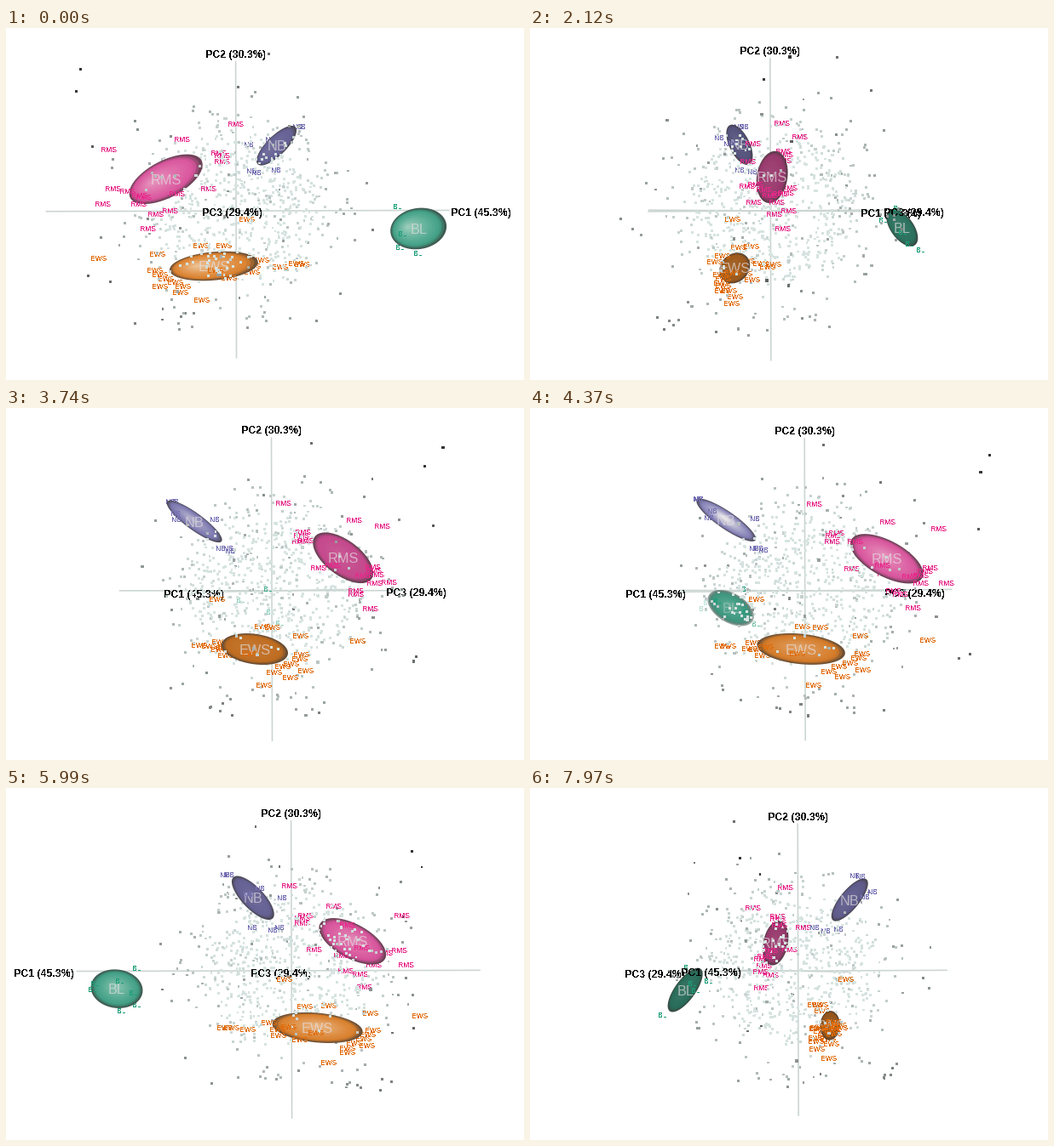
Write a matplotlib script that moves like this. It is 608 px wide and 414 px high and loops after 8000 ms.

```python
import numpy as np
import matplotlib.pyplot as plt
from matplotlib.animation import FuncAnimation
from matplotlib.collections import PolyCollection
from matplotlib.colors import to_rgb

W, H, DPI = 608, 414, 64
PT = 72 / DPI                      # points per pixel
LOOP, INTERVAL = 8000, 40
HOLD, STEP, DEGREES = 500, 90, 3
CENTER_X, CENTER_Y, CAMERA = 302.5, 215, 1600
ORIGIN = np.array([-32.5, 0, -2.5])
LAYERS = 12

plt.rcParams["font.family"] = "Liberation Sans"
fig = plt.figure(figsize=(W / DPI, H / DPI), dpi=DPI, facecolor="white")
ax = fig.add_axes([0, 0, 1, 1])
ax.set(xlim=(0, W), ylim=(H, 0))
ax.axis("off")

# Sample positions: x right, y down, z towards the viewer.
RMS = [(-32, -101, 13), (-91, -80, 75), (-174, -69, 70), (-52, -67, 29),
       (-48, -64, 28), (-48, -57, 26), (-100, -55, 12), (-170, -25, 60),
       (-153, -22, 70), (-180, -8, 75), (-138, -17, 80), (-140, -8, 77),
       (-135, -16, 65), (-98, -19, 62), (-105, 0, 70), (-122, 4, 62),
       (-129, 20, 77), (-63, -26, 43), (-120, -28, 36)]
NB = [(43, -106, -100), (47, -106, -95), (-18, -82, -66), (-15, -49, -58),
      (-8, -47, -44), (15, -50, -38), (9, -90, -105), (22, -84, -100)]
BL = [(151, -4, 64), (170, 11, 33), (200, 14, 40), (203, 21, 35),
      (156, 26, 69), (152, 41, 81), (171, 48, 86)]
EWS = [(-20, 10, -65), (-190, 54, 33), (-125, 50, -5), (-75, 41, -18),
       (-47, 41, -20), (-128, 70, -5), (-122, 75, -5), (-116, 80, -12),
       (-105, 84, -18), (-122, 88, 2), (-96, 90, -25), (-98, 96, -6),
       (-74, 106, -28), (-58, 71, -38), (-41, 80, -22), (-14, 74, -52),
       (-3, 59, -56), (-13, 67, -60), (20, 67, -42), (40, 64, -66),
       (47, 65, -51), (-25, 64, -56)]
OUTLIERS = [(-197, -153, 131), (-205, -131, 105), (6, -177, 64),
            (-185, -69, 125), (-193, 72, 100), (-168, 78, 110),
            (-126, 134, -85), (-126, 121, -95), (-103, 131, -90),
            (-98, 127, -100), (-87, 127, -95), (3, 127, 35), (62, 131, -20),
            (92, 100, -40), (97, -13, 10), (74, -42, 20)]


def lerp(a, b, t):
    return np.asarray(a) + (np.asarray(b) - np.asarray(a)) * t


def view(points, angle):
    """Turn about the vertical axis; return screen x, y, depth and scale."""
    x, y, z = np.asarray(points, float).T
    c, s = np.cos(angle), np.sin(angle)
    side, depth = x * c + z * s, z * c - x * s
    scale = CAMERA / (CAMERA - depth)
    sx = CENTER_X + side * scale + 0.0028 * y
    sy = CENTER_Y + y * scale - 0.0028 * side - 0.006 * depth
    return sx, sy, depth, scale


def label(text, px, **style):
    return ax.text(0, 0, text, fontsize=px * PT, ha="center", va="center", **style)


def visible(depth):
    """Things fade out at the far clipping plane."""
    return float(np.clip((depth + 181) / 22, 0, 1))


class Cluster:
    LEVELS = np.linspace(1, 0.08, 16)
    CIRCLE = np.array([np.cos(np.linspace(0, 2 * np.pi, 60)),
                       np.sin(np.linspace(0, 2 * np.pi, 60))])

    def __init__(self, name, color, body, center, shape, samples):
        self.body, self.center, self.shape = np.array(to_rgb(body)), center, shape
        xx, xz, zz = shape[:3]
        self.narrow, self.wide = np.sqrt(np.linalg.eigvalsh([[xx, xz], [xz, zz]]))
        self.shell = PolyCollection([], linewidths=0)
        ax.add_collection(self.shell, autolim=False)
        self.title = label(name, 16.3, color="#e6e0e2", alpha=0.65)
        self.samples = samples
        self.tags = [label(name, 8.5, color=color, antialiased=False) for _ in samples]

    def draw(self, angle):
        (x,), (y,), (depth,), (scale,) = view([self.center], angle)
        c, s = np.cos(angle), np.sin(angle)
        xx, xz, zz, xy, zy, yy = self.shape
        var = c * c * xx + 2 * c * s * xz + s * s * zz
        cov = -(c * xy + s * zy)
        root = np.linalg.cholesky([[var, cov], [cov, yy]]) * scale

        broad = np.clip((np.sqrt(var) - self.narrow) / (self.wide - self.narrow), 0, 1)
        gloss = broad ** 8
        tone = self.body * (0.66 + 0.34 * broad)
        rim = lerp(tone * 0.6, (0.36, 0.34, 0.33), 0.5)
        drift = np.array([-0.2 * (1 + c), -0.12])
        verts, colors = [], []
        for t in self.LEVELS:
            inner = 1 - t
            outline = root @ (self.CIRCLE * t + (drift * inner)[:, None])
            verts.append((outline + [[x], [y]]).T)
            color = lerp(rim, tone, min(1, inner * 7))
            white = min(1, 0.1 * inner + 0.85 * gloss * inner ** 1.2)
            colors.append((*lerp(color, (1, 1, 0.96), white), visible(depth)))
        self.shell.set_verts(verts)
        self.shell.set_facecolor(colors)
        self.shell.set_zorder(depth)

        self.title.set_position((x, y + 1.6))
        self.title.set_alpha(0.65 * visible(depth))
        self.title.set_zorder(depth + 1)
        for tag, px, py, d, _ in zip(self.tags, *view(self.samples, angle)):
            tag.set_position((px, py + 0.8))
            tag.set_zorder(d + 12)
            tag.set_alpha(visible(d))


def make_cloud():
    rng = np.random.default_rng(11)

    def shell(count, radius, spread, squash):
        way = rng.normal(size=(count, 3))
        way /= np.linalg.norm(way, axis=1)[:, None]
        return way * np.abs(rng.normal(radius, spread, (count, 1))) * squash

    core = shell(620, 88, 22, (1, 0.9, 1)) + (-28, -8, 0)
    halo = shell(105, 138, 20, (1, 0.9, 1)) + (-32, 2, 0)
    return np.vstack([core, halo, OUTLIERS])


cloud = make_cloud()
distance = np.linalg.norm(cloud - ORIGIN, axis=1)
shade = np.clip((distance - 95) / 150, 0, 1)[:, None]
cloud_colors = lerp((0.84, 0.89, 0.88), (0.2, 0.2, 0.2), shade)
layers = [ax.scatter([], [], marker="s", linewidths=0, antialiased=False)
          for _ in range(LAYERS)]

# Each axis: negative end, positive end, and the label with its place.
AXES = [((-223, 0, 0), (250, 0, 0), "PC1 (45.3%)", (288, 2.5, 0)),
        ((0, 173, 0), (0, -176, 0), "PC2 (30.3%)", (0, -185, 0)),
        ((0, 0, -180), (0, 0, 168), "PC3 (29.4%)", (0, 2.5, 186))]
axis_lines = [ax.plot([], [], color="#cbd5d2", lw=1.6 * PT, zorder=-500)[0] for _ in AXES]
axis_labels = [label(a[2], 12.4, weight="bold", color="black", antialiased=False)
               for a in AXES]

clusters = [
    Cluster("RMS", "#e7298a", "#e0509f", (-111, -36, 52),
            (1740, -657, 534, 680, -340, 800), RMS),
    Cluster("NB", "#7570b3", "#7672b0", (16, -81, -80),
            (610, -479, 733, 460, -562, 600), NB),
    Cluster("BL", "#1b9e77", "#38a084", (175, 21, 58),
            (1010, -222, 421, 80, -357, 552), BL),
    Cluster("EWS", "#e06a08", "#de7c22", (-60, 66, -34),
            (2815, -936, 470, 235, -86, 313), EWS),
]


def update(frame):
    time = (frame + 0.5) * INTERVAL
    step = 0 if time < HOLD else int((time - HOLD) // STEP) + 1
    angle = np.radians(step * DEGREES)

    for line, text, (low, high, _, place) in zip(axis_lines, axis_labels, AXES):
        x, y, depth, _ = view(ORIGIN + np.array([low, high, place]), angle)
        line.set_data(x[:2], y[:2])
        text.set_position((x[2], y[2] + 1.2))
        text.set_zorder(depth[2])

    x, y, depth, scale = view(cloud, angle)
    for layer, part in zip(layers, np.array_split(np.argsort(depth), LAYERS)):
        layer.set_offsets(np.column_stack([x[part], y[part]]))
        layer.set_sizes((2.9 * PT * scale[part]) ** 2)
        layer.set_facecolor(cloud_colors[part])
        layer.set_zorder(depth[part].mean())

    for cluster in clusters:
        cluster.draw(angle)
    return []


anim = FuncAnimation(fig, update, frames=LOOP // INTERVAL, interval=INTERVAL,
                     init_func=lambda: [], repeat=True, repeat_delay=0, blit=False)
plt.show()
```
